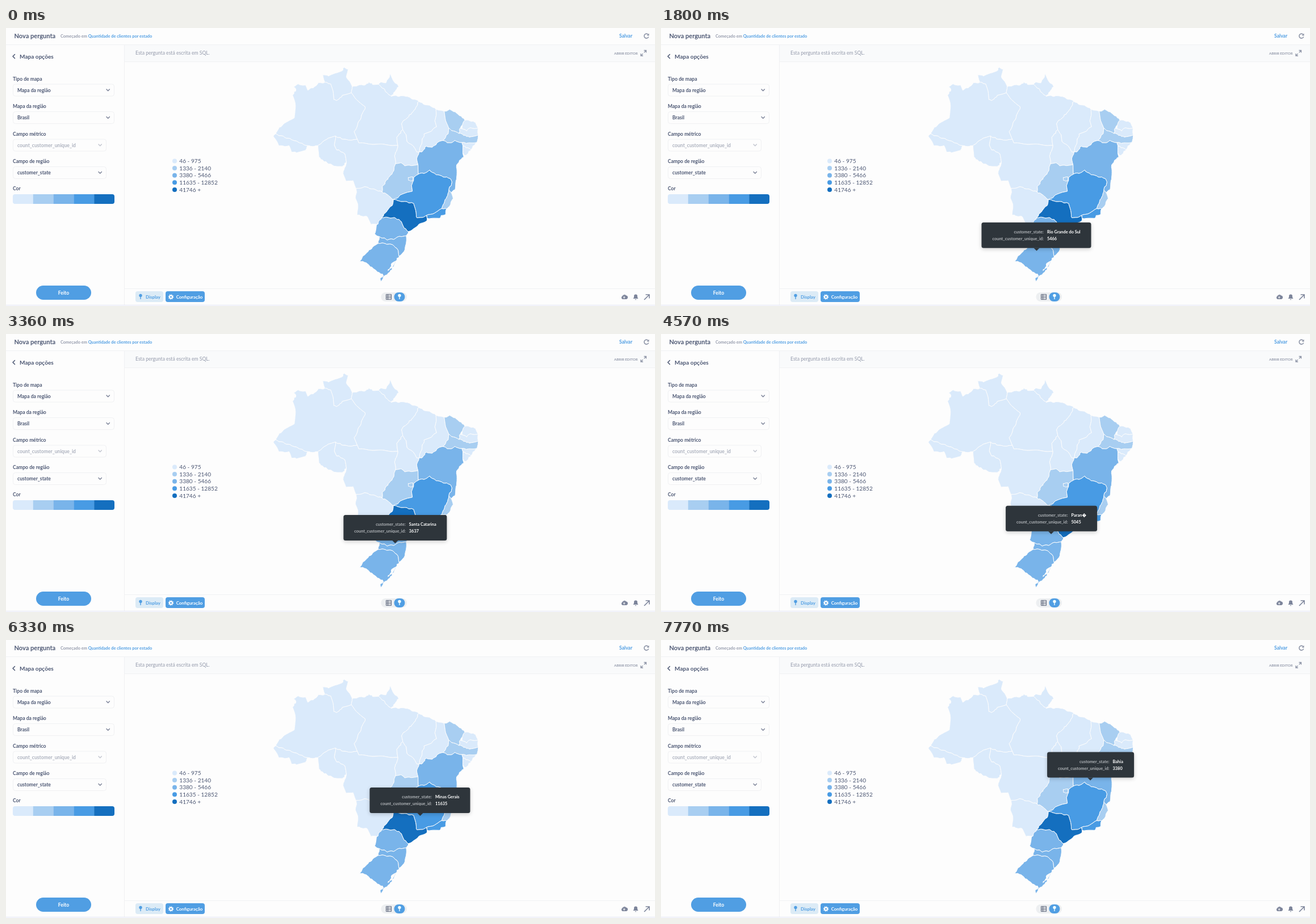
These frames come from a looping animation (1143 by 490 pixels, 8 s). An HTML page:

```html
<!DOCTYPE html>
<html lang="pt-BR">
<head>
<meta charset="utf-8">
<title>Nova pergunta</title>
<style>
html, body { margin: 0; width: 100%; height: 100%; overflow: hidden; background: #fdfdfd; }
svg { position: absolute; left: 0; top: 0; }
text { font: 700 8.6px Lato, sans-serif; fill: #4c5773; }
.small { font-size: 7.4px; }
.muted { fill: #949aab; }
.blue { fill: #509ee3; }
.white { fill: #fff; }
.line { fill: none; stroke: #f0f1f3; }
.icon { fill: none; stroke: #8f96a8; stroke-width: 1.6; }
.chevron { fill: none; stroke: #7d8499; stroke-width: 1.5; stroke-linecap: round; stroke-linejoin: round; }
#map path { stroke: #fdfdfd; stroke-width: 1; stroke-linejoin: round; }
#legend text { font-size: 10.1px; font-weight: 400; }
#tip {
  position: absolute; left: 0; top: 0; box-sizing: border-box; height: 45px; padding: 11px 19px;
  display: grid; grid-template-columns: auto auto; column-gap: 6px; grid-auto-rows: 11.5px;
  font: 700 7.4px/11.5px Lato, sans-serif; color: #fff; white-space: nowrap;
  background: #2e353b; border-radius: 3.5px; box-shadow: 0 2px 7px rgba(0, 0, 0, .2);
}
#tip span { color: #b0b4b8; text-align: right; }
#tip::after {
  content: ""; position: absolute; left: 50%; top: 100%; margin-left: -5px;
  border: 5px solid transparent; border-top-color: #2e353b; border-bottom: 0;
}
</style>
</head>
<body>
<svg width="1143" height="490" viewBox="0 0 1143 490">
  <path d="M209 30H1143V59H209Z" fill="#f9fafb"/>
  <path class="line" d="M0 29.5H1143M208.5 30V488M209 59.5H1143M209 459.5H1143"/>
  <path d="M0 488.5H1143" stroke="#e3e5f6"/>

  <text x="14.5" y="18" style="font-size:11.05px">Nova pergunta</text>
  <text x="96" y="16.8" class="small muted">Começado em <tspan class="blue">Quantidade de clientes por estado</tspan></text>
  <text x="1080" y="17.3" class="blue">Salvar</text>
  <path class="icon" d="M1131 11.5A4 4 0 1 0 1131.700 15.500"/>
  <path d="M1128.500 13.500H1132.500V9.500Z" fill="#8f96a8"/>

  <text x="228" y="47.2" class="muted" style="font-weight:400">Esta pergunta está escrita em SQL.</text>
  <text x="1071" y="46.900" class="muted" style="font-size:6.1px">ABRIR EDITOR</text>
  <path class="icon" style="stroke-width:1.3" d="M1123.500 39.500H1127.500V43.500M1127.500 39.500L1123.800 43.200M1122 49H1118V45M1118 49L1121.700 45.300"/>

  <path class="chevron" style="stroke:#4c5773" d="M15.500 46.500L12 50L15.500 53.500"/>
  <text x="24" y="53.600" style="font-size:10.1px">Mapa opções</text>
  <g id="fields"></g>
  <text x="12" y="286">Cor</text>
  <clipPath id="round"><rect x="12" y="293" width="179" height="17" rx="4"/></clipPath>
  <g id="swatches" clip-path="url(#round)"></g>
  <rect x="53" y="454" width="97" height="25" rx="12.5" fill="#509ee3"/>
  <text x="101.500" y="469.600" class="white" text-anchor="middle">Feito</text>

  <g id="map"></g>
  <g id="legend"></g>

  <rect x="228" y="464" width="49" height="19" rx="4" fill="#dcebf6"/>
  <g id="pin" fill="#509ee3"><circle cx="237" cy="471.500" r="2.700"/><path d="M236.300 473H237.700V478H236.300Z"/></g>
  <text x="246" y="476.700" class="blue" style="font-size:7.900px">Display</text>
  <rect x="281" y="464" width="69" height="19" rx="4" fill="#509ee3"/>
  <g fill="none" stroke="#fff">
    <circle cx="290.500" cy="474" r="2.500" stroke-width="2"/>
    <circle cx="290.500" cy="474" r="4" stroke-width="1.300" stroke-dasharray="1.570"/>
  </g>
  <text x="299.700" y="476.700" class="white" style="font-size:7.900px">Configuração</text>
  <rect x="660.500" y="466" width="45.500" height="16" rx="8" fill="#edeff1"/>
  <rect x="683.500" y="466" width="19" height="16" rx="8" fill="#509ee3"/>
  <use href="#pin" x="456" style="filter:brightness(3)"/>
  <path class="icon" style="stroke:#5a6378;stroke-width:1" d="M669.500 469.500H678.500V478.500H669.500ZM669.500 472.500H678.500M669.500 475.500H678.500M672.500 469.500V478.500"/>

  <g fill="#7d859b">
    <path d="M1086 478A3 3 0 0 1 1085.500 472.500A3.800 3.800 0 0 1 1092 471.500A3.300 3.300 0 0 1 1092.500 478Z"/>
    <path d="M1104.500 477L1106 474.500V472.500A3 3 0 0 1 1112 472.500V474.500L1113.500 477ZM1107.500 478H1110.500L1109 479.500Z"/>
  </g>
  <path d="M1088.700 472.500V476M1087 474.500L1088.700 476.300L1090.400 474.500" fill="none" stroke="#fff"/>
  <path class="icon" style="stroke:#7d859b" d="M1124 479L1132.500 470.500M1126.500 470H1133V476.500"/>
</svg>
<div id="tip"><span>customer_state:</span><b id="state"></b><span>count_customer_unique_id:</span><b id="count"></b></div>

<script>
const $ = id => document.getElementById(id);
const shades = ['#daeafb', '#a8cef1', '#79b4ea', '#489be4', '#146fbf'];

// [shade, corner points]; neighbours share corners
const states = [
  [0, '558,82 568,85 580,79 592,76 595,69 602,73 600,86 605,95 609,104 609,115 593,118 584,128 577,126 575,110 571,98 562,96'],
  [0, '656,99 661,96 670,96 677,80 682,92 691,103 685,112 678,121 668,111 661,103'],
  [0, '507,103 514,99 527,101 531,109 541,105 551,97 562,96 571,98 575,110 577,126 584,128 593,118 609,115 615,124 633,139 614,183 619,197 597,197 580,191 567,195 553,204 549,208 531,208 510,199 475,187 481,175 499,163 507,158 510,138 505,118 511,108'],
  [0, '609,104 620,101 634,100 639,95 646,99 656,99 661,103 668,111 678,121 687,119 693,121 701,119 714,124 727,129 721,143 709,156 696,168 698,180 689,192 690,207 622,203 619,197 614,183 633,139 615,124 609,115'],
  [0, '475,187 510,199 531,208 528,215 512,220 503,218 498,208 480,208 471,190'],
  [0, '549,208 553,204 567,195 580,191 579,206 583,214 596,221 599,237 592,245 575,242 560,235 551,227'],
  [0, '580,191 597,197 619,197 622,203 690,207 685,226 686,240 681,255 672,266 663,280 662,289 647,284 631,280 617,284 612,270 598,270 594,256 599,237 596,221 583,214 579,206'],
  [0, '617,284 631,280 647,284 662,289 673,294 683,303 680,312 672,321 662,334 655,345 643,347 637,333 619,330 619,312 616,298'],
  [0, '689,192 698,180 704,188 706,201 717,207 722,217 727,219 724,229 725,240 715,242 703,243 696,238 686,240 685,226 690,207'],
  [0, '727,129 736,134 746,137 758,143 757,152 756,164 758,174 749,181 737,187 733,198 730,210 727,219 722,217 717,207 706,201 704,188 698,180 696,168 709,156 721,143'],
  [0, '758,143 771,147 775,163 779,177 778,187 770,198 759,203 750,211 740,208 734,217 727,219 730,210 733,198 737,187 749,181 758,174 756,164 757,152'],
  [0, '808,162 820,164 828,167 831,177 818,176 811,181 803,177 803,171'],
  [0, '803,177 811,181 818,176 831,177 832,188 816,192 809,190 798,185 799,178'],
  [0, '803,202 817,203 829,201 819,214 805,208'],
  [0, '805,208 819,214 810,225 804,221'],
  [1, '771,147 782,144 794,150 808,162 803,171 799,178 798,185 788,182 779,177 775,163'],
  [1, '779,177 788,182 798,185 809,190 816,192 832,188 829,201 817,203 803,202 790,199 780,203 770,198 778,187'],
  [1, '686,240 696,238 703,243 715,242 725,240 727,257 718,263 715,278 716,287 707,290 695,295 683,303 673,294 662,289 663,280 672,266 681,255'],
  [1, '708,263 716,263 716,269 708,269'],
  [1, '779,286 784,290 787,300 781,314 776,319 768,318 772,305 778,295'],
  [2, '727,219 734,217 740,208 750,211 759,203 770,198 780,203 790,199 803,202 805,208 804,221 806,227 797,236 793,245 794,266 790,285 784,290 779,286 786,272 782,265 770,262 757,258 746,251 735,256 727,257 725,240 724,229'],
  [2, '662,334 674,334 686,335 697,341 702,352 709,359 705,367 693,367 683,372 672,373 657,368 649,363 652,350 656,342'],
  [2, '657,368 672,373 683,372 693,367 705,367 704,385 700,396 693,402 690,391 680,382 668,380 656,379'],
  [2, '656,379 668,380 680,382 690,391 693,402 686,411 684,418 676,430 665,439 660,449 658,443 665,436 652,428 641,420 634,413 623,411 631,400 644,388'],
  [3, '727,257 735,256 746,251 757,258 770,262 782,265 786,272 779,286 778,295 772,305 768,318 755,326 741,331 727,335 722,333 721,321 717,309 706,307 683,303 695,295 707,290 716,287 715,278 718,263'],
  [3, '741,331 755,326 768,318 776,319 774,328 766,331 764,336 750,336 741,335'],
  [4, '683,303 706,307 717,309 721,321 722,333 727,335 741,331 741,339 730,345 720,352 709,359 702,352 697,341 686,335 674,334 662,334 672,321 680,312'],
  [-1, '685,411 680,414 677,422 672,428 680,423']
];

// Splits each side and shifts the points by a fixed wave, so shared borders stay shared.
function coast(points) {
  const corners = points.split(' ').map(p => p.split(',').map(Number));
  const out = corners.flatMap(([x, y], i) => {
    const [u, v] = corners[(i + 1) % corners.length];
    const n = Math.ceil(Math.hypot(u - x, v - y) / 3.5);
    return Array.from({ length: n }, (_, k) => {
      const a = x + (u - x) * k / n, b = y + (v - y) * k / n;
      return (a + .8 * Math.sin(b * 1.9 + a * .7)).toFixed(1) + ' ' + (b + .8 * Math.sin(a * 1.7 - b * .6)).toFixed(1);
    });
  });
  return 'M' + out.join('L') + 'Z';
}

$('map').innerHTML = states.map(([s, points]) => `<path d="${coast(points)}" fill="${shades[s] || '#fdfdfd'}"/>`).join('');
$('swatches').innerHTML = shades.map((c, i) => `<rect x="${12 + i * 35.8}" y="293" width="36" height="17" fill="${c}"/>`).join('');
$('legend').innerHTML = ['46 - 975', '1336 - 2140', '3380 - 5466', '11635 - 12852', '41746 +'].map((label, i) => {
  const y = 234.5 + i * 12.6;
  return `<circle cx="297" cy="${y}" r="4" fill="${shades[i]}"/><text x="305.3" y="${y + 3.7}">${label}</text>`;
}).join('');
$('fields').innerHTML = [
  ['Tipo de mapa', 'Mapa da região', 179],
  ['Mapa da região', 'Brasil', 179],
  ['Campo métrico', 'count_customer_unique_id', 165],
  ['Campo de região', 'customer_state', 165]
].map(([label, value, width], i) => {
  const y = 109.500 + i * 48.500;
  return `<text x="12" y="${y - 17}">${label}</text><rect class="line" x="12.5" y="${y - 10.5}" width="${width - 1}" height="21" rx="4"/>
    <g opacity="${i == 2 ? .45 : 1}"><text x="20" y="${y + 3}">${value}</text>
    <path class="chevron" d="M${width - 2} ${y - 1.5}l2.700 2.700 2.700-2.700"/></g>`;
}).join('');

// [first step, last step, steps, centre x, top y]
const moves = [
  [500, 500, 1, 671.5, 358], [550, 550, 1, 663.5, 357], [690, 880, 3, 657.5, 354],
  [1510, 1890, 5, 662, 340], [2040, 2330, 4, 684, 327.5], [2420, 2710, 4, 685, 325],
  [2900, 2990, 2, 685.5, 324], [3360, 3360, 1, 685.5, 319], [3470, 3470, 1, 685, 313],
  [3610, 3900, 4, 685, 305], [4570, 5180, 8, 704.5, 286], [5510, 5770, 5, 716, 272],
  [5940, 6180, 4, 729.5, 261], [6330, 6330, 1, 729, 260], [6490, 6940, 9, 738.5, 255],
  [7140, 7770, 11, 756.5, 197.5]
];
const names = [
  [500, 'Rio Grande do Sul', 5466], [2130, 'Santa Catarina', 3637], [3470, 'Paran\uFFFD', 5045],
  [4830, 'S\uFFFDo Paulo', 41746], [6020, 'Minas Gerais', 11635], [7700, 'Bahia', 3380]
];

function draw(now) {
  const t = now % 8000;
  let x = 671.5, y = 358;
  for (const [from, to, steps, endX, endY] of moves) {
    if (t < from) break;
    const gap = (to - from) / (steps - 1) || 1;
    const part = Math.min(steps, Math.floor((t - from) / gap + .01) + 1) / steps;
    x += (endX - x) * part;
    y += (endY - y) * part;
  }
  const name = names.findLast(([start]) => t >= start);
  $('tip').style.visibility = name ? 'visible' : 'hidden';
  if (name) [, $('state').textContent, $('count').textContent] = name;
  $('tip').style.transform = `translate(${x}px, ${y}px) translateX(-50%)`;
  requestAnimationFrame(draw);
}
requestAnimationFrame(draw);
</script>
</body>
</html>
```
